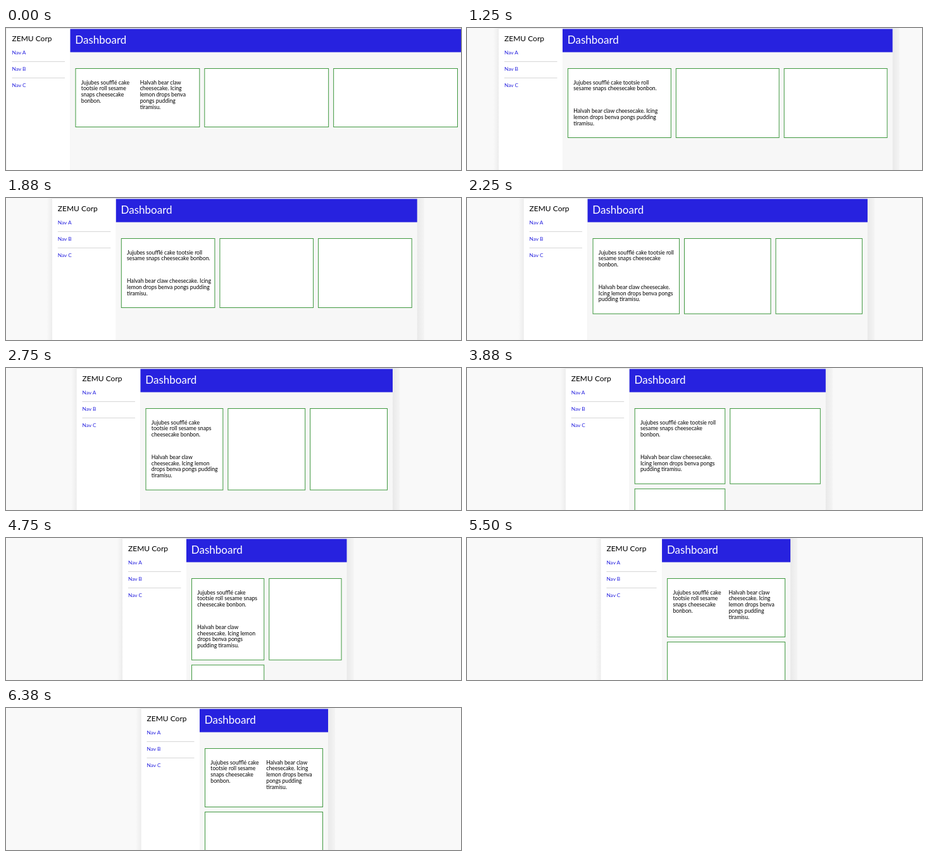
An HTML page for the animation above (6.62 s loop, 719 by 226 pixels).

```html
<!DOCTYPE html>
<html lang="en">
<head>
<meta charset="utf-8">
<title>Responsive dashboard</title>
<style>
  html, body { margin: 0; width: 100%; height: 100%; overflow: hidden; background: #f9f9f9; }
  svg { display: block; width: 719px; height: 226px; }
  text { font-family: Lato, "Open Sans", sans-serif; font-size: 8.7px; }
  .brand { font-size: 12px; }
  .title { font-size: 17px; fill: #fff; }
  .nav { font-size: 8.3px; fill: #2722df; }
  .card { fill: #fff; stroke: #3f983f; }
</style>
</head>
<body>
<svg viewBox="0 0 719 226">
  <defs>
    <linearGradient id="rightShade">
      <stop offset="0" stop-color="#e9e9e9"/><stop offset="1" stop-color="#f4f4f4"/>
    </linearGradient>
    <linearGradient id="leftShade">
      <stop offset="0" stop-color="#f9f9f9"/><stop offset="1" stop-color="#eee"/>
    </linearGradient>
  </defs>
  <g id="scene"></g>
</svg>
<script>
const LOOP = 6620, TICK = 125;
const CENTER = 361, SIDEBAR = 101.5, MAIN_MIN = 203;
const PAD = 8.5, GAP = 8, CARD_MIN = 112, CARD_TOP = 64.5;
const LINE = 9.8, PARAGRAPH_GAP = 25.8;

// [tick, left edge of the page]
const DRAG = [[0, 0], [5, 0], [8, 47.5], [9, 47.5], [10, 49.5], [15, 72.3], [21, 105.8],
  [22, 111], [27, 132], [31, 155.2], [33, 162], [38, 183.5], [39, 188], [45, 215.5],
  [46, 216.5], [47, 216.5], [51, 213]];

// [minimum column width, wrapped text], widest first
const FIRST = [
  [148, "Jujubes soufflé cake tootsie roll sesame|snaps cheesecake bonbon."],
  [129, "Jujubes soufflé cake tootsie roll|sesame snaps cheesecake bonbon."],
  [118, "Jujubes soufflé cake tootsie roll|sesame snaps cheesecake|bonbon."],
  [105, "Jujubes soufflé cake tootsie|roll sesame snaps|cheesecake bonbon."],
  [95, "Jujubes soufflé cake|tootsie roll sesame snaps|cheesecake bonbon."],
  [0, "Jujubes soufflé cake|tootsie roll sesame|snaps cheesecake|bonbon."]
];
const SECOND = [
  [129, "Halvah bear claw cheesecake. Icing|lemon drops benva pongs pudding|tiramisu."],
  [115, "Halvah bear claw cheesecake.|Icing lemon drops benva pongs|pudding tiramisu."],
  [110, "Halvah bear claw cheesecake.|Icing lemon drops benva|pongs pudding tiramisu."],
  [102, "Halvah bear claw|cheesecake. Icing lemon|drops benva pongs pudding|tiramisu."],
  [91, "Halvah bear claw|cheesecake. Icing lemon|drops benva pongs|pudding tiramisu."],
  [0, "Halvah bear claw|cheesecake. Icing|lemon drops benva|pongs pudding|tiramisu."]
];

const scene = document.getElementById("scene");

const rect = (x, y, w, h, attrs) => `<rect x="${x}" y="${y}" width="${w}" height="${h}" ${attrs}/>`;
const text = (x, y, content, style = "") => `<text x="${x}" y="${y}" class="${style}">${content}</text>`;
const paragraph = (x, y, lines) => lines.map((line, i) => text(x, y + i * LINE, line)).join("");
const wrap = (versions, width) => versions.find(([min]) => width >= min)[1].split("|");

function leftAt(tick) {
  const next = DRAG.findIndex(([k]) => k >= tick);
  if (next < 0) return DRAG[DRAG.length - 1][1];
  if (next === 0) return DRAG[0][1];
  const [k0, x0] = DRAG[next - 1], [k1, x1] = DRAG[next];
  return x0 + (x1 - x0) * (tick - k0) / (k1 - k0);
}

function sidebar(left, width) {
  let out = rect(left, 1, width, 226, 'fill="#fff"') + text(left + 9, 21, "ZEMU Corp", "brand");
  ["A", "B", "C"].forEach((name, i) => {
    const y = 41.8 + i * 26.2;
    out += text(left + 9, y, "Nav " + name, "nav");
    if (i < 2) out += rect(left + 9, 53 + i * 26, width - 17.5, 1, 'fill="#d6d6d6"');
  });
  return out;
}

function cards(left, width) {
  const columns = Math.max(1, Math.min(3, Math.floor((width + GAP) / (CARD_MIN + GAP))));
  const cardWidth = (width - GAP * (columns - 1)) / columns;
  const inner = cardWidth - 18;
  const sideBySide = inner >= 165;
  const textWidth = sideBySide ? (inner - GAP) / 2 : inner;
  const first = wrap(FIRST, textWidth), second = wrap(SECOND, textWidth);
  const height = sideBySide
    ? 44 + LINE * Math.max(first.length, second.length)
    : 61 + LINE * (first.length + second.length);

  let out = "";
  for (let i = 0; i < 3; i++) {
    const x = left + (i % columns) * (cardWidth + GAP);
    const y = CARD_TOP + Math.floor(i / columns) * (height + GAP);
    out += rect(x, y, cardWidth, height, 'class="card"');
  }
  const x = left + 8.8, y = CARD_TOP + 25.1;
  out += paragraph(x, y, first);
  out += sideBySide
    ? paragraph(x + textWidth + GAP, y, second)
    : paragraph(x, y + first.length * LINE + PARAGRAPH_GAP, second);
  return out;
}

function render(time) {
  const left = leftAt(Math.floor(time % LOOP / TICK));
  const right = 2 * CENTER - left;
  const mainWidth = Math.max(right - left - SIDEBAR, MAIN_MIN);
  const main = right - mainWidth;
  scene.innerHTML =
    rect(left - 8, 0, 8, 226, 'fill="url(#leftShade)"') +
    rect(right, 0, 11, 226, 'fill="url(#rightShade)"') +
    rect(left, 0, right - left, 226, 'fill="#e4e4e4"') +
    sidebar(left + 0.5, main - left - 0.5) +
    rect(main, 1, mainWidth, 226, 'fill="#f7f7f7"') +
    rect(main, 1.5, mainWidth, 37, 'fill="#2722df"') +
    text(main + 7.8, 25, "Dashboard", "title") +
    cards(main + PAD, mainWidth - 2 * PAD);
}

function loop() {
  render(performance.now());
  requestAnimationFrame(loop);
}
loop();
</script>
</body>
</html>
```
